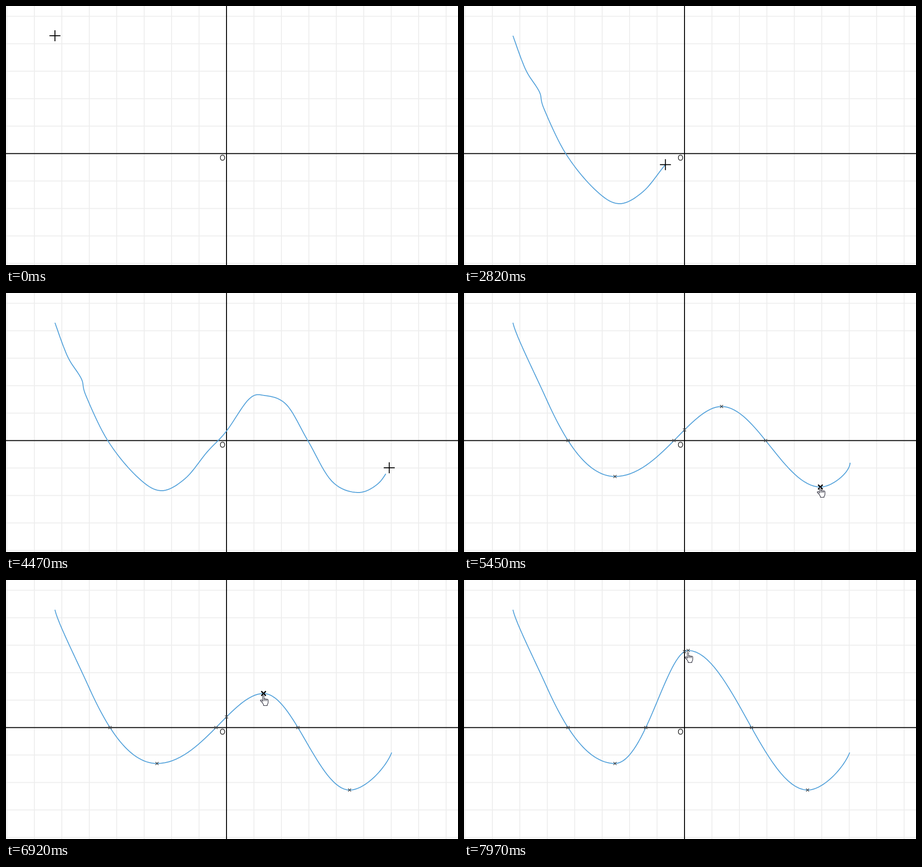
An HTML page with a canvas for the animation above (8 s loop, 988x566 px).

```html
<!DOCTYPE html>
<html>
<head>
<meta charset="utf-8">
<style>
html, body { margin: 0; width: 100%; height: 100%; overflow: hidden; background: #fff; }
canvas { display: block; }
</style>
</head>
<body>
<canvas id="stage" width="988" height="566"></canvas>
<script>
const ctx = document.getElementById('stage').getContext('2d');
const LOOP = 8000, AXIS_X = 482, AXIS_Y = 322.5, SMOOTHED = 4840, BLUE = '#56a3db';

const mix = (a, b, k) => a + (b - a) * k;
const mixPoint = (p, q, k) => p.map((v, i) => mix(v, q[i], k));
const ramp = (t, from, to) => Math.min(1, Math.max(0, (t - from) / (to - from)));

// Moves are [from, to, ...position]; between moves the position holds.
const follow = (start, moves, t) =>
  moves.reduce((p, [from, to, ...end]) => mixPoint(p, end, ramp(t, from, to)), start);

// Cubic Bezier as a polyline.
function bezier(a, b, c, d, steps = 32) {
  return Array.from({ length: steps + 1 }, (_, i) => {
    const s = i / steps, r = 1 - s;
    return a.map((v, j) => r * r * r * v + 3 * r * r * s * b[j] + 3 * r * s * s * c[j] + s * s * s * d[j]);
  });
}

// Bezier between two turning points; handles are level, sized as shares of the width.
function wave(a, b, out, back) {
  const w = b[0] - a[0];
  return bezier(a, [a[0] + w * out, a[1]], [b[0] - w * back, b[1]], b);
}

// Catmull-Rom spline through a few key points.
function spline(pts) {
  return pts.slice(1).flatMap((c, i) => {
    const b = pts[i], a = pts[i - 1] || b, d = pts[i + 2] || c;
    return bezier(b, b.map((v, j) => v + (c[j] - a[j]) / 6), c.map((v, j) => v - (d[j] - b[j]) / 6), c, 10);
  });
}

// Points where a polyline meets a vertical (axis 0) or horizontal (axis 1) line.
function crossings(line, axis, value) {
  return line.slice(1).flatMap((b, i) => {
    const a = line[i];
    return (a[axis] < value) === (b[axis] < value) ? []
      : [mixPoint(a, b, (value - a[axis]) / (b[axis] - a[axis]))];
  });
}

// Freehand stroke, drawn in five pulls of the pen.
const stroke = spline([[107, 65], [126, 118], [140, 149], [165, 188], [175, 225], [222, 322], [285, 400],
  [338, 432], [391, 406], [440, 347], [481, 303], [531, 232], [565, 224], [613, 244], [660, 323],
  [712, 411], [768, 436], [814, 416], [844, 371]]);
const penMoves = [[540, 1040, 168], [1190, 1750, 242], [1750, 1940, 277], [2000, 2640, 440],
  [2820, 3600, 660], [3770, 4480, 840], [4480, 4590, 844]];

// Smooth curve: fixed start and first dip, movable peak and second dip.
const START = [107, 65], BEND = [181, 234], DIP = [330, 401];
const head = [...bezier(START, [113, 93], [154, 174], BEND), ...bezier(BEND, [217, 314], [266, 401], DIP)];
const tailBefore = [[779, 424], [804, 424], [843, 393], [844, 371]];
const tailAfter = [[751, 459], [786, 459], [831, 409], [843, 377]];

const peakMoves = [[7010, 7280, 512, 182], [7340, 7370, 508, 175], [7600, 7970, 490, 154]];
const cursorMoves = [[5010, 5450, 779, 424], [5670, 5860, 751, 459], [6130, 6350, 554, 252],
  [6520, 6800, 563, 252]];

const hand = new Path2D('M-1 13V2q0-2 1.5-2t1.5 2v6q0-1 1.5-1t1.5 1.5q0-1 1.5-1t1.5 1.5' +
  'q0-1 1.5-1t1.5 2v5q0 3-2 5v2h-8v-2l-3-5-3.5-3.5q-1-2 1-2t3.5 2zM2 8v4M5 9v3M8 9v3');

function polyline(pts, color, width) {
  ctx.beginPath();
  pts.forEach(p => ctx.lineTo(...p));
  ctx.strokeStyle = color;
  ctx.lineWidth = width;
  ctx.stroke();
}

function drawGrid() {
  const vertical = (x, color) => polyline([[x, 0], [x, 566]], color, 2);
  const horizontal = (y, color) => polyline([[0, y], [988, y]], color, 2);
  ctx.fillStyle = '#fff';
  ctx.fillRect(0, 0, 988, 566);
  for (let x = AXIS_X % 60; x < 988; x += 60) vertical(x, '#eee');
  for (let y = AXIS_Y % 60; y < 566; y += 60) horizontal(y, '#eee');
  horizontal(AXIS_Y, '#000');
  vertical(AXIS_X, '#000');
  ctx.fillStyle = '#222';
  ctx.font = '17px Inter, sans-serif';
  ctx.textAlign = 'center';
  ctx.fillText('O', 473.2, 338.3);
}

function drawMarker([x, y], bold) {
  const r = bold ? 5 : 3.3, color = bold ? '#000' : '#444', width = bold ? 2.7 : 1.4;
  polyline([[x - r, y - r], [x + r, y + r]], color, width);
  polyline([[x - r, y + r], [x + r, y - r]], color, width);
}

function drawCross([x, y]) {
  polyline([[x - 12, y], [x + 12, y]], '#000', 2);
  polyline([[x, y - 12], [x, y + 12]], '#000', 2);
}

function drawHand([x, y]) {
  ctx.save();
  ctx.translate(x - 1, y + 0.5);
  ctx.fillStyle = '#fff';
  ctx.fill(hand);
  ctx.strokeStyle = '#112';
  ctx.lineWidth = 1.1;
  ctx.stroke(hand);
  ctx.restore();
}

function drawSketching(t) {
  const penAt = time => {
    const [x] = follow([107], penMoves, time);
    return crossings(stroke, 0, x)[0] || stroke[x > 107 ? stroke.length - 1 : 0];
  };
  const end = penAt(t - 30); // the ink trails the pen
  if (end[0] > 107) polyline([...stroke.filter(p => p[0] < end[0]), end], BLUE, 2);
  drawCross(penAt(t));
}

function drawEditing(t) {
  const peak = follow([563, 248], peakMoves, t);
  const dipShift = ramp(t, 5670, 5860);
  const tail = tailBefore.map((p, i) => mixPoint(p, tailAfter[i], dipShift));
  const curve = [...head, ...wave(DIP, peak, 0.41, 0.29), ...wave(peak, tail[0], 0.345, 0.355), ...bezier(...tail)];
  polyline(curve, BLUE, 2);

  const cursor = t < 7010 ? follow([844, 371], cursorMoves, t) : [peak[0], peak[1] + 4];
  const dragging = (t > 5670 && t < 5860) || t > 7010;
  const near = p => Math.hypot(p[0] - cursor[0], p[1] - cursor[1]) < 9;
  const markers = [DIP, peak, tail[0], ...crossings(curve, 1, AXIS_Y), ...crossings(curve, 0, AXIS_X)];
  markers.forEach(p => drawMarker(p, !dragging && near(p)));
  (dragging || markers.some(near) ? drawHand : drawCross)(cursor);
}

function frame() {
  const t = performance.now() % LOOP;
  ctx.lineJoin = 'round';
  drawGrid();
  (t < SMOOTHED ? drawSketching : drawEditing)(t);
  requestAnimationFrame(frame);
}
frame();
</script>
</body>
</html>
```
